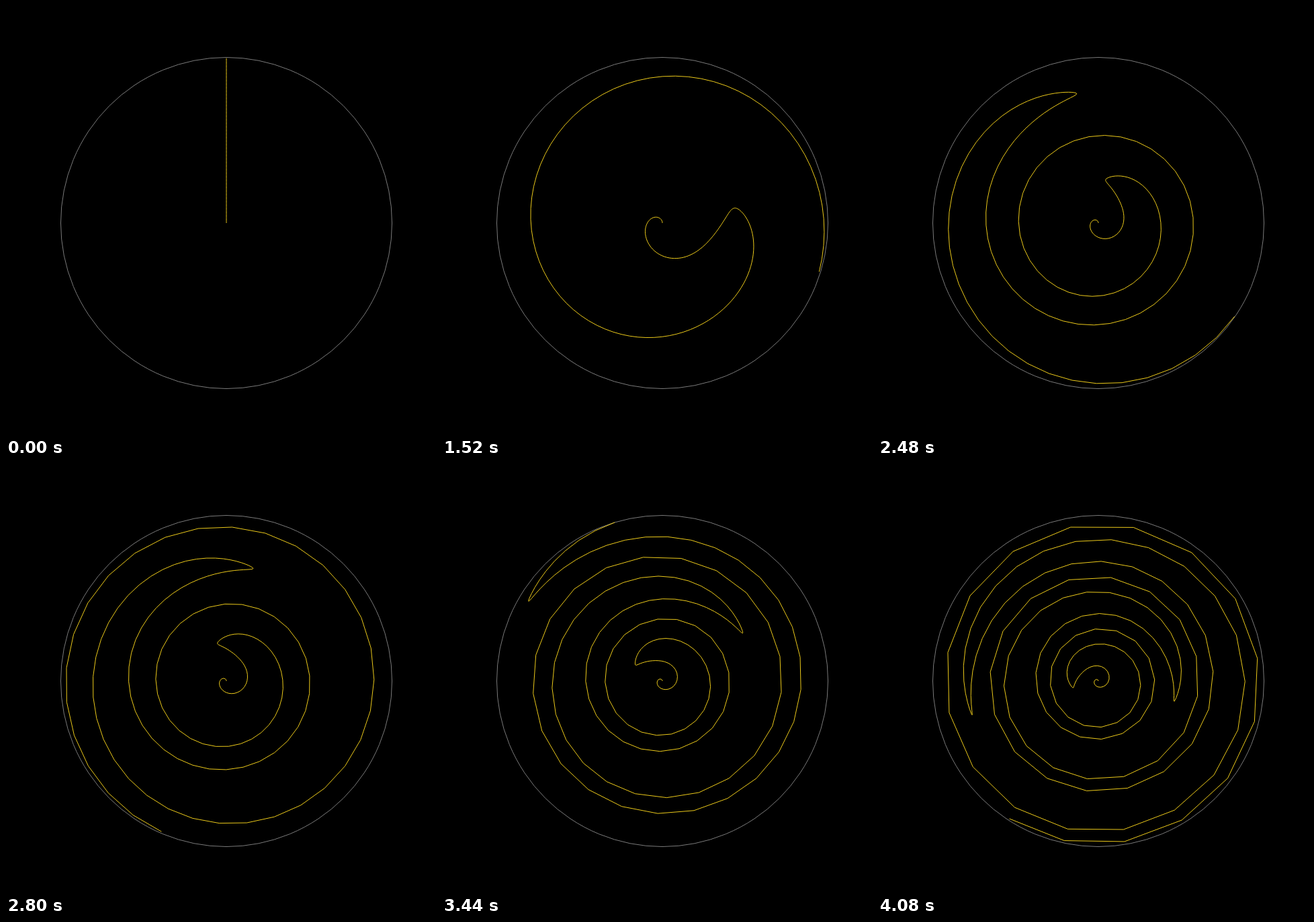
Recreate the animation shown at these times as an HTML page. Size 640 px wide and 640 px high, loop 4.16 s.

```html
<!DOCTYPE html>
<html lang="en">
<head>
<meta charset="utf-8">
<title>Twisting radius</title>
<style>
  html, body { margin: 0; width: 100%; height: 100%; overflow: hidden; background: #000; }
  svg { display: block; width: 100vw; height: 100vh; }
</style>
</head>
<body>
<svg viewBox="0 0 640 640" fill="none">
  <circle cx="328" cy="323" r="246.5" stroke="#888" stroke-width="0.9"/>
  <path id="curve" stroke="#f8d41c" stroke-width="0.95" stroke-linejoin="round"/>
</svg>
<script>
const LOOP = 4160, STEP = 80, SAMPLES = 200;
const CX = 328, CY = 323, RADIUS = 246.5, RIPPLE = 0.005;
const curve = document.getElementById('curve');

// The twist grows by 0.2 per step after a short start.
function twistAt(step) {
  return step === 0 ? 0 : Math.max(0.05, 0.2 * step - 0.25);
}

// Each point of the radius swings round the centre; a small ripple
// along the radius sharpens the turning points.
function curvePath(twist) {
  const swing = Math.PI + twist / 2;
  const points = [];
  for (let i = 0; i < SAMPLES; i++) {
    const u = i / SAMPLES;
    const phase = twist * u;
    const angle = swing * Math.sin(phase);
    const r = RADIUS * (u + RIPPLE * Math.sin(10 * phase));
    const x = CX - r * Math.sin(angle);
    const y = CY - r * Math.cos(angle);
    points.push(x.toFixed(2) + ' ' + y.toFixed(2));
  }
  return 'M' + points.join('L');
}

const start = performance.now();

function render() {
  const time = Math.max(0, performance.now() - start) % LOOP;
  curve.setAttribute('d', curvePath(twistAt(Math.floor(time / STEP))));
  requestAnimationFrame(render);
}
render();
</script>
</body>
</html>
```
